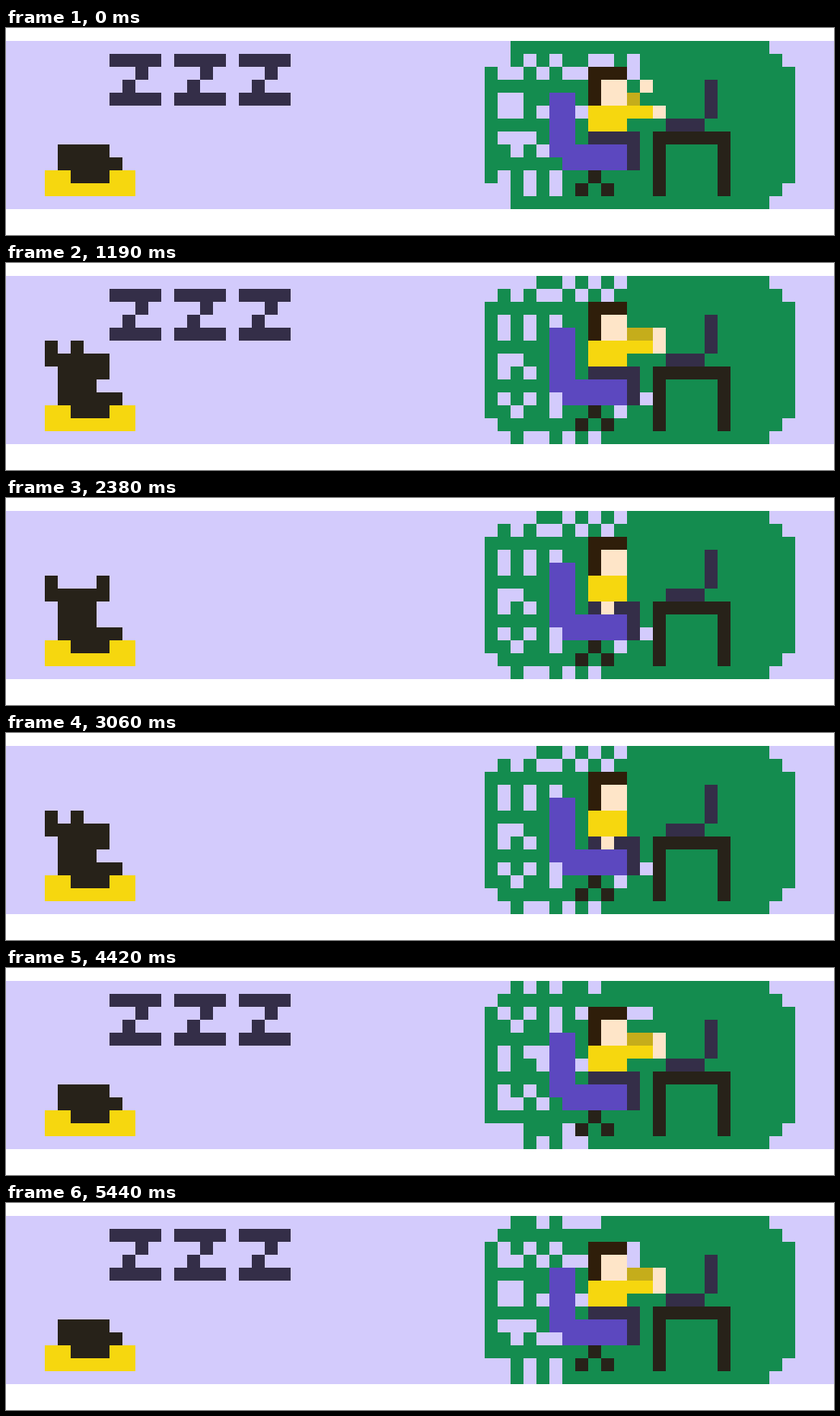
These frames come from a looping animation (1024 by 256 pixels, 5.61 s). An HTML page with a canvas:

```html
<!DOCTYPE html>
<html lang="en">
<head>
<meta charset="utf-8">
<title>Coder and cat</title>
<style>
  html, body { margin: 0; width: 100%; height: 100%; overflow: hidden; background: #fff; }
  canvas { display: block; }
</style>
</head>
<body>
<canvas id="stage" width="1024" height="256"></canvas>
<script>
const CELL = 16, STEP_MS = 170, STEPS = 33;
const LAVENDER = '#d3cbfc', GREEN = '#148c4f', YELLOW = '#f6d70f', BLACK = '#272219',
      VIOLET = '#5c48bf', SLATE = '#342e48', SKIN = '#fee5c8', HAIR = '#2f1e0a', SLEEVE = '#c5ad1b';

// Code lines on the green panel, two rows each with a blank row between.
const CODE = [
  '# # #  ## #', '## # ##   #', '',
  '##   #', '## # ##', '',
  '###  # # #', ' # ## # #', '',
  '# # #', '# # #', '',
  '##  ##', '# # #  #', '',
  '# # # ##  ##', ' #  #    #', '',
  '# ## # #', '#  # ###', ''
];

// Typing runs from step 19 through the loop end to step 7.
const TYPING_START = 19, TYPING_STEPS = 22;

const ctx = document.getElementById('stage').getContext('2d');

function box(color, x, y, w = 1, h = 1) {
  ctx.fillStyle = color;
  ctx.fillRect(x * CELL, y * CELL, w * CELL, h * CELL);
}

function drawPanel(scroll) {
  box(GREEN, 39, 1, 20, 13);
  box(GREEN, 38, 2, 22, 11);
  box(GREEN, 37, 3, 24, 9);
  for (let y = 1; y <= 13; y++) {
    const row = CODE[(y - 2 + scroll + CODE.length) % CODE.length];
    [...row].forEach((mark, i) => { if (mark === '#') box(LAVENDER, 38 + i, y); });
  }
}

function drawDesk() {
  box(BLACK, 50, 8, 6);
  box(BLACK, 50, 8, 1, 5);
  box(BLACK, 55, 8, 1, 5);
  box(SLATE, 51, 7, 3);
  box(SLATE, 54, 4, 1, 3);
}

function drawCoder(typing, handUp) {
  box(VIOLET, 42, 5, 2, 5);
  box(VIOLET, 43, 9, 5, 2);
  box(BLACK, 45, 11);
  box(BLACK, 44, 12);
  box(BLACK, 46, 12);
  box(SLATE, 45, 8, 4);
  box(SLATE, 48, 9, 1, 2);
  box(HAIR, 45, 3, 3);
  box(HAIR, 45, 4, 1, 2);
  box(SKIN, 46, 4, 2, 2);
  box(YELLOW, 45, 6, 3, 2);
  if (!typing) {
    box(SKIN, 46, 8);
    return;
  }
  box(YELLOW, 48, 6, 2);
  box(SKIN, 50, 6);
  box(SLEEVE, 48, 5, handUp ? 1 : 2);
  if (handUp) box(SKIN, 49, 4);
  else box(SKIN, 50, 5);
}

function drawCat(pose) {
  box(YELLOW, 3, 11, 7, 2);
  box(BLACK, 5, 11, 3);
  box(BLACK, 4, 10, 5);
  if (pose === 'asleep') {
    box(BLACK, 4, 9, 4);
    return;
  }
  box(BLACK, 4, 8, 3, 2);
  box(BLACK, 3, 6, 1, 2);
  box(BLACK, 4, 7, 4);
  if (pose === 'front') {
    box(BLACK, 7, 6);
  } else {
    box(BLACK, 5, 6);
    box(BLACK, 7, 8);
  }
}

function drawZ(x, y) {
  box(SLATE, x, y, 4);
  box(SLATE, x + 2, y + 1);
  box(SLATE, x + 1, y + 2);
  box(SLATE, x, y + 3, 4);
}

function catPose(step) {
  if (step < 7 || step > 20) return 'asleep';
  return step > 8 && step < 15 ? 'front' : 'side';
}

function draw(step) {
  const typed = (step - TYPING_START + STEPS) % STEPS;
  const typing = typed < TYPING_STEPS;
  const scroll = 7 + Math.min(typed, TYPING_STEPS - 1);

  box('#fff', 0, 0, 64, 16);
  box(LAVENDER, 0, 1, 64, 13);
  drawPanel(scroll);
  drawDesk();
  drawCoder(typing, typed % 2 === 0);
  drawCat(catPose(step));
  if (step < 8 || step > 21) [8, 13, 18].forEach(x => drawZ(x, 2));
}

const start = performance.now();
function tick() {
  const elapsed = Math.max(0, performance.now() - start);
  draw(Math.floor(elapsed / STEP_MS) % STEPS);
  requestAnimationFrame(tick);
}
tick();
</script>
</body>
</html>
```
